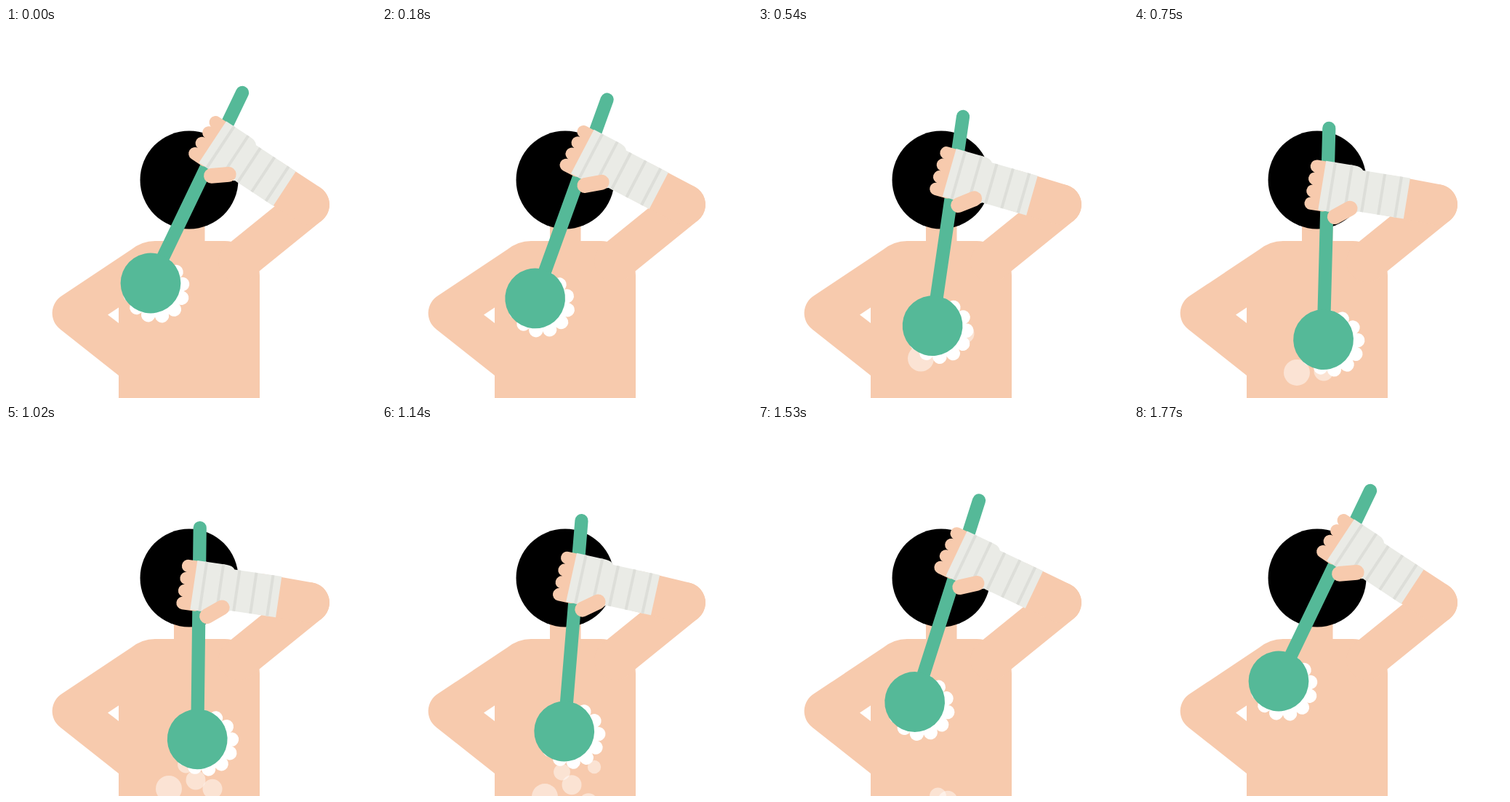
Animation, 509 px wide and 509 px high, one loop 1.8 s. Source, as an HTML page:

```html
<!DOCTYPE html>
<html lang="en">
<head>
<meta charset="utf-8">
<title>Back brush</title>
<style>
  html, body { margin: 0; width: 100%; height: 100%; overflow: hidden; background: #fff; }
  svg { display: block; width: 100vw; height: 100vh; }
  .skin { fill: #f7caad; }
  .limb { fill: none; stroke: #f7caad; stroke-linecap: round; }
  .green { fill: #55b998; stroke: #55b998; }
  .wrap { fill: #eaebe6; }
</style>
</head>
<body>
<svg viewBox="0 0 509 509">
  <path class="skin" d="M231 265H273.5V300H231Z"/>
  <circle cx="252" cy="209" r="67.5"/>
  <path class="skin" d="M155 510V478L74.7 414.5A28 28 0 0 1 76.6 368.6L172 305Q187 293 205 293H301A48 48 0 0 1 349 341V510Z"/>
  <path fill="#fff" d="M140 394.5L155 384.5V406Z"/>
  <path class="limb" stroke-width="56" stroke-linecap="butt" d="M417 243L320 321.5"/>
  <g id="bubbles" fill="#fff" fill-opacity=".47"></g>
  <line id="forearm" class="limb" stroke-width="56" x1="417" y1="243"/>
  <!-- Hand and brush: origin at the pivot, x axis along the forearm -->
  <g id="hand">
    <g id="foam" fill="#fff"><circle cx="-107.6" cy="207.5" r="37"/></g>
    <path class="green" stroke-width="18.2" stroke-linecap="round" d="M-158.2 -83.8L-119.2 204.4"/>
    <circle class="green" stroke="none" style="stroke:none" cx="-119.2" cy="204.4" r="41.4"/>
    <path id="fingers" class="limb" stroke-width="17.4"/>
    <path class="wrap" d="M-155 -38.8H-115Q-106 -38.8 -102.5 -33.9H-37V22.8H-100L-110 29.5H-155Z"/>
    <path id="stripes" fill="none" stroke="#dddeD9" stroke-width="4"/>
    <path class="limb" stroke-width="20.8" d="M-130.8 35.1L-112 20.4"/>
  </g>
</svg>
<script>
const LOOP = 1800, STEP = 30, TURN = 900, REST = 1770, SWING = 29, TILT = 33.4;
const pivot = { x: 411, y: 246 };
const $ = id => document.getElementById(id);

function circle(parent, cx, cy, r) {
  const c = document.createElementNS('http://www.w3.org/2000/svg', 'circle');
  move(c, cx, cy, r);
  return $(parent).appendChild(c);
}

function move(c, cx, cy, r) {
  c.setAttribute('cx', cx);
  c.setAttribute('cy', cy);
  c.setAttribute('r', r);
}

for (let i = 0; i < 12; i++) {
  const a = (30 * i - 15.4) * Math.PI / 180;
  circle('foam', -107.6 + 36.5 * Math.cos(a), 207.5 + 36.5 * Math.sin(a), 9.7);
}

$('fingers').setAttribute('d', [0, 1, 2, 3].map(i => `M-166.5 ${-29.5 + 17.2 * i}H-150`).join(''));

$('stripes').setAttribute('d', [0, 1, 2, 3, 4].map(i => {
  const [top, bottom] = i < 2 ? [-38.8, 29.5] : [-33.9, 22.8];
  return `M${-142 + 23.25 * i} ${top}V${bottom}`;
}).join(''));

// x, radius, birth time, y at birth, speed in px per ms
const bubbles = [
  [284, 13.5, 250, 372.9, 0.164],
  [224, 18, 450, 446.2, 0.0926],
  [261, 13.5, 560, 461.4, 0.0556],
  [247.5, 11.4, 600, 430.7, 0.084],
  [292, 9.2, 750, 414.4, 0.14]
].map(([x, r, born, y, speed]) => ({ x, r, born, y, speed, el: circle('bubbles', x, y, 0) }));

function draw(t) {
  const swing = SWING * (t <= TURN ? t / TURN : (REST - t) / (REST - TURN));
  const deg = TILT - swing, a = deg * Math.PI / 180;
  $('hand').setAttribute('transform', `translate(${pivot.x} ${pivot.y}) rotate(${deg})`);

  const u = -62, v = -5.6;
  $('forearm').setAttribute('x2', pivot.x + u * Math.cos(a) - v * Math.sin(a));
  $('forearm').setAttribute('y2', pivot.y + u * Math.sin(a) + v * Math.cos(a));

  for (const b of bubbles) {
    const age = Math.max(0, t - b.born);
    move(b.el, b.x, b.y + b.speed * age, b.r * Math.min(1, age / 90));
  }
}

function tick() {
  draw(Math.floor(performance.now() % LOOP / STEP) * STEP);
  requestAnimationFrame(tick);
}
tick();
</script>
</body>
</html>
```
